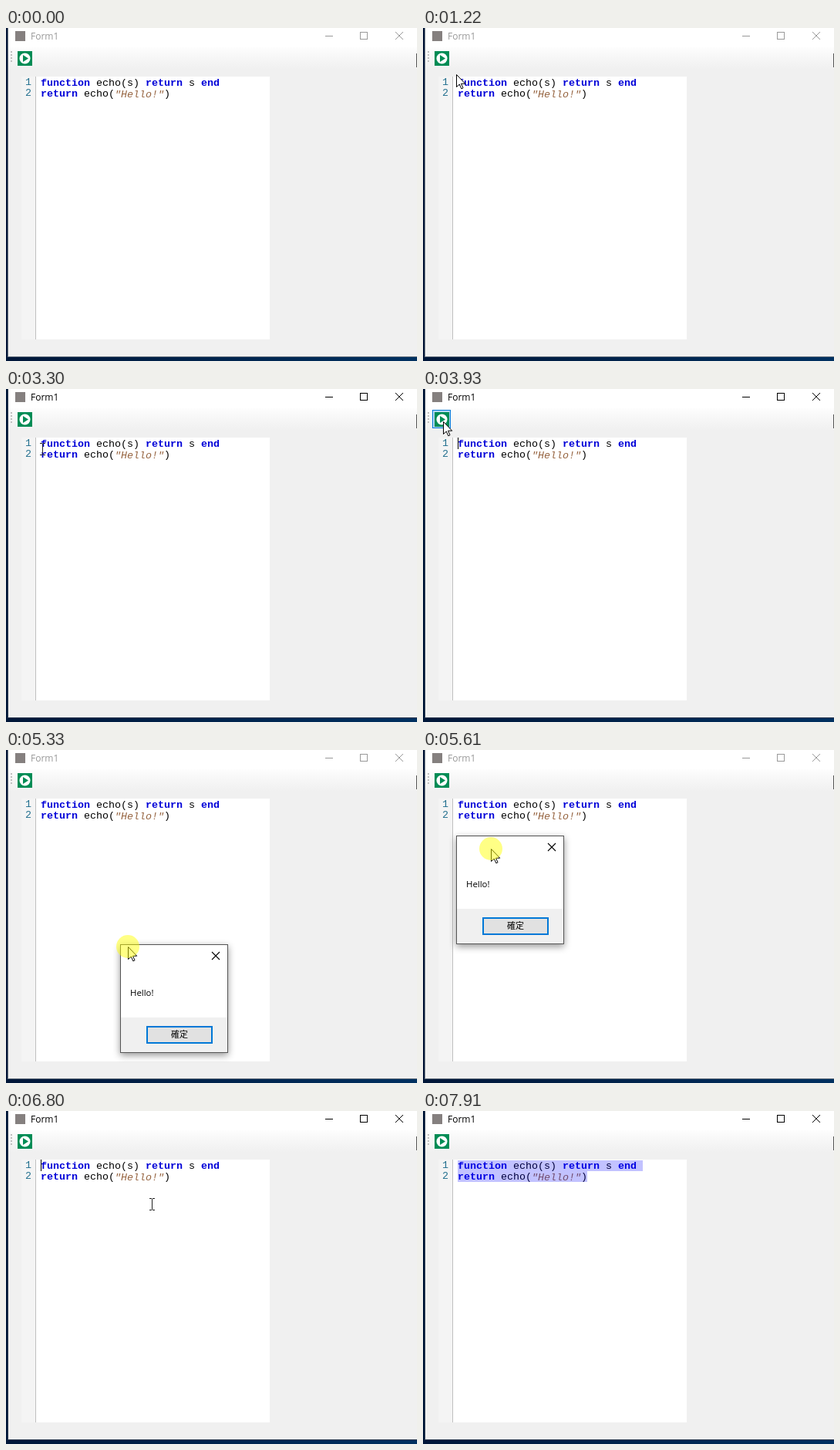
An HTML page that plays this animation: 533x432 px, repeating every 8 s.

```html
<!DOCTYPE html>
<html>
<head>
<meta charset="utf-8">
<style>
html, body { margin: 0; width: 533px; height: 432px; overflow: hidden; }
svg { display: block; }
text { font: 12px "Open Sans", sans-serif; }
.code text { font: 13.33px "Courier New", "Liberation Mono", monospace; white-space: pre; }
.code .key { fill: #0000d8; font-weight: bold; }
.code .str { fill: #966440; font-style: italic; }
.code .num { fill: #23708f; }
rect, .crisp { shape-rendering: crispEdges; }
</style>
</head>
<body>
<svg width="533" height="432" viewBox="0 0 533 432">
  <defs>
    <linearGradient id="strip" x2="0" y2="1"><stop stop-color="#fdfdfd"/><stop offset="1" stop-color="#f0f0f0"/></linearGradient>
    <linearGradient id="desk"><stop stop-color="#001638"/><stop offset="1" stop-color="#003060"/></linearGradient>
    <filter id="shadow" x="-20%" y="-20%" width="140%" height="145%"><feDropShadow dx="0" dy="3" stdDeviation="5" flood-opacity=".42"/></filter>
    <filter id="tipShadow"><feDropShadow dx="2" dy="2" stdDeviation="1" flood-opacity=".4"/></filter>
  </defs>

  <rect width="533" height="432" fill="url(#desk)"/>
  <rect id="frame" x="2" width="531" height="427"/>
  <rect x="3" width="530" height="426" fill="#f0f0f0"/>
  <rect x="3" width="530" height="25" fill="#fff"/>
  <rect x="3" y="25" width="530" height="28" fill="url(#strip)"/>
  <path class="crisp" d="M532.5 33V51" stroke="#555"/>
  <path class="crisp" d="M7 30V46" stroke="#c0c0c0" stroke-width="2" stroke-dasharray="2 2"/>

  <rect x="12" y="4" width="13" height="13" fill="#85807f"/>
  <text id="title" x="32" y="15">Form1</text>
  <g id="chrome" fill="none">
    <path class="crisp" d="M414 10.5H424M459.5 5.5H468.5V14.5H459.5Z"/>
    <path d="M505 5L515 15M515 5L505 15"/>
  </g>

  <rect id="hover" x="12.5" y="27.5" width="23" height="23" stroke="#0078d7"/>
  <rect x="15" y="30" width="19" height="19" fill="#008c55"/>
  <circle cx="24.5" cy="39.5" r="7" fill="#fff"/>
  <path d="M22 35L29 39.5L22 44Z" fill="#008c55"/>

  <rect x="20" y="63" width="322" height="341" fill="#fff"/>
  <rect x="20" y="63" width="18" height="341" fill="#f4f4f4"/>
  <rect x="38" y="63" width="1" height="341" fill="#c0c0c0"/>
  <g class="code">
    <text class="num" x="25" y="74">1</text>
    <text class="num" x="25" y="88">2</text>
    <text x="45" y="75"><tspan class="key">function</tspan> echo(s) <tspan class="key">return</tspan> s <tspan class="key">end</tspan></text>
    <text x="45" y="89"><tspan class="key">return</tspan> echo(<tspan class="str" dy="1">"Hello!"</tspan><tspan dy="-1">)</tspan></text>
  </g>
  <g id="selection" fill="#00f" fill-opacity=".24">
    <rect id="sel1" y="64" height="14"/>
    <rect id="sel2" y="78" height="14"/>
  </g>
  <rect id="caret" width="1" height="15"/>

  <g id="tip">
    <rect x="31.5" y="72.5" width="105" height="19" fill="#fff" stroke="#767676" filter="url(#tipShadow)"/>
    <text x="37" y="86" fill="#575757">toolStripButton1</text>
  </g>

  <g id="dialog">
    <rect width="140" height="141" fill="#555" filter="url(#shadow)"/>
    <rect x="1" y="1" width="138" height="94" fill="#fff"/>
    <rect x="1" y="95" width="138" height="45" fill="#f0f0f0"/>
    <path d="M119 10L129 20M129 10L119 20" stroke="#000" stroke-width="1.1"/>
    <text x="13" y="67" style="font-size:11.4px">Hello!</text>
    <rect id="ok" x="35" y="107" width="84" height="21" stroke="#0078d7" stroke-width="2"/>
    <text x="66" y="121" style="font:11px 'Noto Sans CJK TC','Noto Sans CJK',sans-serif">確定</text>
  </g>

  <g id="pointer">
    <path id="arrow" d="M.5 .5V16.5L4.3 13L6.8 18.8L9 17.8L6.5 12.2H11.7Z" fill="#fff" stroke="#000"/>
    <path id="beam" class="crisp" d="M-3 -7.5H0M1 -7.5H4M.5 -7V7M-3 7.5H0M1 7.5H4" stroke="#222"/>
    <circle id="press" r="15" fill="#ff0" fill-opacity=".48"/>
  </g>
</svg>
<script>
const LOOP = 8000, STEP = 70, BLINK = 530;
const CLICK = 1420, TIP = 1890, LEAVE = 3230, RUN = 4000, OPEN = 4130;
const DRAG = 5330, DROP = 5680, OK = 6170, CLOSE = 6310, SELECT = 7010, GONE = 7570;

const $ = id => document.getElementById(id);
const set = (id, attrs) => { for (const k in attrs) $(id).setAttribute(k, attrs[k]); };
const show = (id, on) => set(id, { visibility: on ? 'inherit' : 'hidden' });
const between = (t, a, b) => t >= a && t < b;

const move = (start, end, a, via, b) => ({
  start,
  at(t) {
    const u = Math.max(0, Math.min(1, Math.floor((t - start) / STEP) * STEP / (end - start)));
    return a.map((v, i) => Math.round((1 - u) ** 2 * v + 2 * u * (1 - u) * via[i] + u * u * b[i]));
  }
});

const button = [26, 42], okSpot = [144, 228], titleBar = [88, 128];
const moves = [
  move(590, 1290, [238, 409], [110, 120], button),
  move(CLICK, 1700, button, [28, 41], [31, 40]),
  move(LEAVE, 3930, [31, 40], [120, 250], button),
  move(4400, 4470, [120, 86], [250, 150], [378, 211]),
  move(DRAG, 5540, [158, 255], titleBar, titleBar),
  move(DROP, 6100, titleBar, [116, 178], okSpot),
  move(CLOSE, 6940, okSpot, [151, 157], [214, 92]),
  move(SELECT, GONE, [213, 87], [46, 73], [8, 60])
];
const dialogMove = move(DRAG, 5610, [148, 252], [40, 95], [43, 111]);

function draw(t) {
  const modal = between(t, OPEN, CLOSE);
  const active = t >= CLICK && !modal;
  const ink = active ? '#000' : '#999';
  set('title', { fill: ink });
  set('chrome', { stroke: ink });
  set('frame', { fill: active ? '#2a3a50' : '#6a7480' });

  const [x, y] = (moves.filter(m => m.start <= t).pop() || moves[0]).at(t);
  const visible = between(t, 590, 4540) || between(t, DRAG, GONE);
  const pressed = between(t, CLICK, CLICK + 140) || between(t, RUN, OPEN) ||
    between(t, DRAG, DROP) || between(t, OK, OK + STEP) || between(t, SELECT, 7370);
  const beam = !modal && x > 39 && x < 342 && y > 63 && y < 404;
  set('pointer', { transform: `translate(${x} ${y})` });
  show('pointer', visible);
  show('beam', beam);
  show('arrow', !beam);
  show('press', pressed);

  show('hover', visible && !modal && between(x, 12, 36) && between(y, 27, 51));
  set('hover', { fill: pressed ? '#80bceb' : '#b3d7f3' });

  // Dragging from the end of line 2 back to the start of line 1.
  const selecting = t >= SELECT;
  const col = selecting ? 45 + 8 * Math.max(0, Math.min(21, Math.round((x - 45) / 8))) : 45;
  const second = selecting && y >= 78;
  const left = second ? col : 45;
  show('selection', selecting);
  set('sel1', { x: col, width: second ? 0 : 285 - col });
  set('sel2', { x: left, width: 213 - left });

  const phase = Math.floor((t - (t < CLOSE ? CLICK + 10 : CLOSE + 10)) / BLINK);
  set('caret', { x: col, y: second ? 77 : 63 });
  show('caret', active && (phase % 2 === 0 || between(t, SELECT, 7380)));

  show('tip', between(t, TIP, LEAVE + STEP));
  set('tip', { opacity: t < TIP + STEP ? .5 : 1 });

  show('dialog', between(t, DRAG, CLOSE));
  set('dialog', { transform: `translate(${dialogMove.at(t)})` });
  const onOk = t > DROP && x > 77 && y > 217;
  set('ok', { fill: !onOk ? '#e1e1e1' : pressed ? '#cce4f7' : '#e5f1fb' });
}

const start = performance.now();
function tick() {
  draw((performance.now() - start) % LOOP);
  requestAnimationFrame(tick);
}
tick();
</script>
</body>
</html>
```
